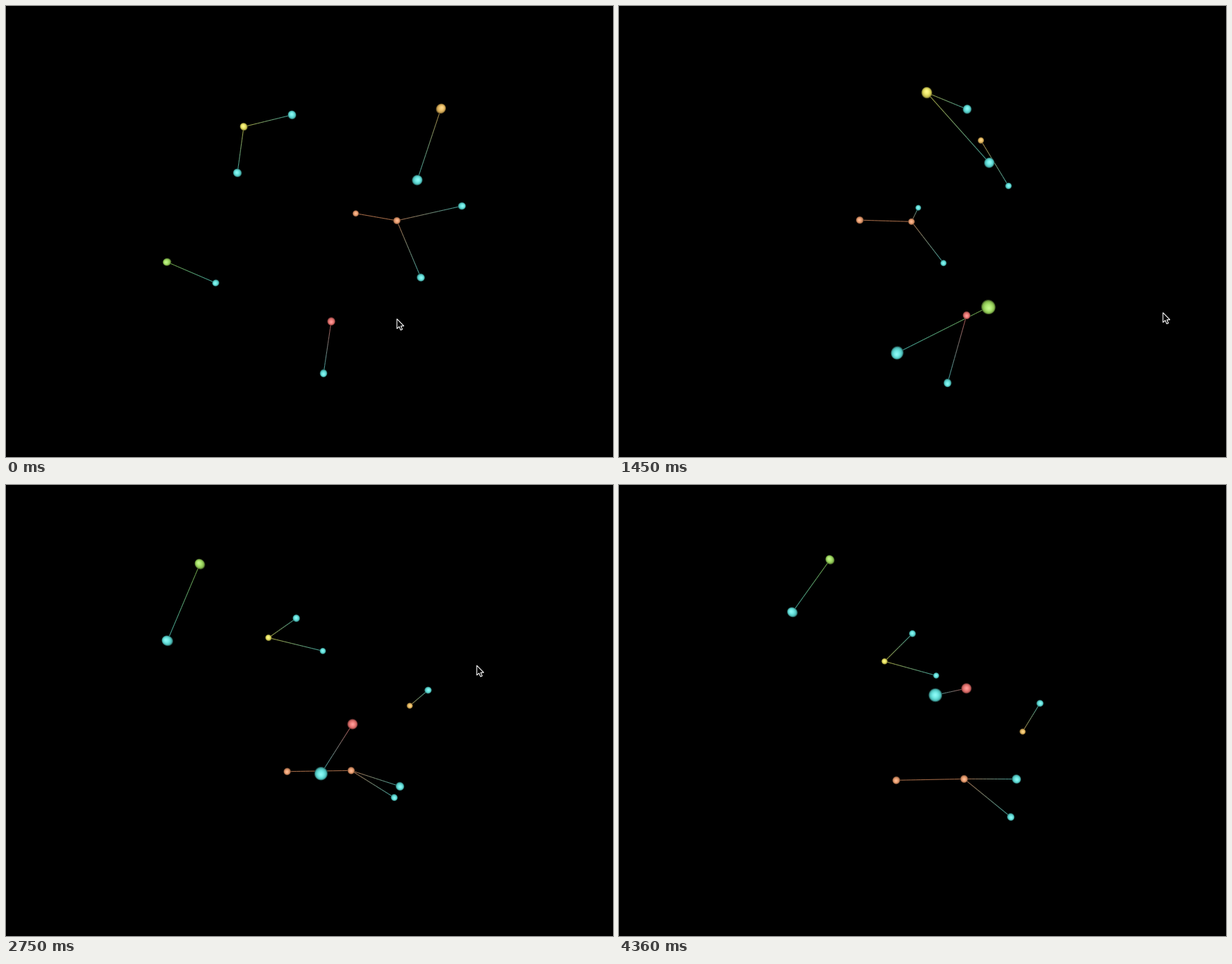
A matplotlib script for the animation above (4760 ms loop, 868x645 px).

```python
import numpy as np
import matplotlib.pyplot as plt
from matplotlib.animation import FuncAnimation
from matplotlib.collections import LineCollection, PolyCollection
from matplotlib.patches import Polygon

W, H = 868, 645
LOOP, STEP = 4760, 28
NAMES = "ABCDEFGHIJKLM"
LINKS = np.array([[NAMES.index(c) for c in pair]
                  for pair in "AB AC DE GF GH GI JK LM".split()])
CYAN = (98, 246, 240)
TINTS = {"A": (255, 248, 98), "D": (255, 202, 98), "F": (255, 166, 112),
         "G": (255, 166, 112), "J": (172, 242, 98), "L": (255, 120, 116)}
RGB = np.array([TINTS.get(c, CYAN) for c in NAMES]) / 255
DIAMETER = 11.2

# Where the stars stand on screen after each turn of the model
VIEWS = [
    dict(A=(340, 173), B=(409, 156), C=(331, 239), D=(622, 147), E=(588, 249),
         F=(500, 297), G=(559, 307), H=(652, 286), I=(593, 388), J=(230, 366),
         K=(300, 396), L=(465, 451), M=(454, 525)),
    dict(A=(326, 167), C=(335.5, 237), D=(628.5, 155), F=(473, 297),
         H=(624.5, 284), I=(585, 380.5), J=(207.5, 380.5), M=(454.5, 528)),
    dict(A=(440.5, 124), B=(498, 147.5), C=(529.5, 224), D=(517.5, 192),
         E=(557, 257), F=(344, 306), G=(418, 308.5), H=(428, 288.5),
         I=(464, 368), J=(528.5, 430.5), K=(398, 496), L=(497, 442),
         M=(470, 539)),
    dict(A=(372, 128), C=(459, 215.5), E=(596, 257), F=(373, 308),
         I=(506, 373.5), J=(347, 409), K=(287.5, 467), M=(463.5, 543)),
    dict(A=(354, 157), B=(448, 168), C=(399, 175.5), D=(585, 230.5),
         E=(611.5, 257.5), F=(411.5, 358.5), G=(494.5, 359), H=(549.5, 363.5),
         I=(553.5, 414), J=(225, 237.5), K=(220.5, 363), L=(492.5, 434),
         M=(455.5, 557)),
    dict(A=(380, 253.5), B=(453.5, 274), C=(420, 213.5), D=(577.5, 354),
         E=(602, 313), F=(396.5, 422.5), G=(493.5, 420.5), H=(560.5, 475.5),
         I=(568.5, 420), J=(302, 107), K=(248.5, 181), L=(497, 289),
         M=(452.5, 296.5)),
]
SEEN = np.array([[v.get(c, (np.nan, np.nan)) for c in NAMES] for v in VIEWS])
KNOWN = ~np.isnan(SEEN)

# First guesses: camera (focal length, centre), turns in degrees, depths
CAM = np.array([420, W / 2, H / 2])
TURNS = np.radians([(0, 17, 0), (0, 81, 0), (-3, -28, 0),
                    (-32, -25, 0), (-60, 3, 0)])
DEPTH = np.array([-35, 16, 19, 100, 115, -79, -10, 20, 25, 5, -50, 45, 6])

# time, turn progress, pointer x, pointer y
KEYS = np.array([
    (0, 0, 559, 447.5), (470, 0, 559, 447.5), (800, 1, 597, 445.5),
    (990, 1.26, 659, 443), (1450, 2, 778, 438.5), (1545, 2, 778.5, 438),
    (1850, 3, 703, 419), (2060, 3.8, 669, 372), (2160, 4, 668, 361),
    (2415, 4, 668, 361), (2930, 4.97, 675, 218), (3130, 5, 675, 214),
    (3310, 5, 675, 214), (3400, 6, 685, 238), (3790, 6, 855, 560),
    (3930, 6, 855, 561), (4180, 6, 844, 641), (LOOP, 6, 844, 641)])
POINTER_GONE = 4350


def rotation(w):
    angle = np.linalg.norm(w)
    if angle < 1e-12:
        return np.eye(3)
    x, y, z = w / angle
    k = np.array([[0, -z, y], [z, 0, -x], [-y, x, 0]])
    return np.eye(3) + np.sin(angle) * k + (1 - np.cos(angle)) * k @ k


def chain(turns):
    poses = [np.eye(3)]
    for w in turns:
        poses.append(rotation(w) @ poses[-1])
    return poses


def project(points, pose, cam):
    """Screen positions and magnification of the turned points."""
    f, cx, cy = cam
    q = points @ pose.T
    k = f / np.maximum(f - q[:, 2], 60)
    return np.column_stack([cx + k * q[:, 0], cy - k * q[:, 1]]), k


def unpack(p):
    return p[:3], p[3:18].reshape(5, 3), p[18:].reshape(-1, 3)


def misfit(p):
    cam, turns, points = unpack(p)
    shown = np.array([project(points, r, cam)[0] for r in chain(turns)])
    length = np.linalg.norm(points[LINKS[:, 0]] - points[LINKS[:, 1]], axis=1)
    return np.concatenate([(shown - SEEN)[KNOWN],
                           0.02 * (length - length.mean()),
                           (cam - CAM) / (50, 8, 8)])


def solve_model(rounds=90, eps=1e-4):
    """Damped least squares for the camera, the turns and the star places."""
    x, y = (SEEN[0] - CAM[1:]).T * (1 - DEPTH / CAM[0])
    p = np.concatenate([CAM, TURNS.ravel(),
                        np.column_stack([x, -y, DEPTH]).ravel()])
    r, damp = misfit(p), 0.01
    for _ in range(rounds):
        jac = np.array([(misfit(p + d) - r) / eps
                        for d in eps * np.eye(len(p))]).T
        a, g = jac.T @ jac, jac.T @ r
        for _ in range(8):
            trial = p - np.linalg.solve(
                a + np.diag(damp * np.diag(a) + 1e-9), g)
            r_new = misfit(trial)
            if r_new @ r_new < r @ r:
                break
            damp *= 4
        else:
            break
        gain = r @ r - r_new @ r_new
        p, r, damp = trial, r_new, max(damp / 5, 1e-7)
        if gain < 1e-5:
            break
    return unpack(p)


def glide(t, ts, vs):
    """Monotone cubic through the keys."""
    h = np.diff(ts)
    d = np.diff(vs) / h
    prod = d[:-1] * d[1:]
    m = np.zeros(len(ts))
    m[1:-1] = np.where(prod > 0,
                       2 * prod / np.where(prod > 0, d[:-1] + d[1:], 1), 0)
    i = min(np.searchsorted(ts, t, side="right") - 1, len(h) - 1)
    s = (t - ts[i]) / h[i]
    return (vs[i] + s * s * (3 - 2 * s) * (vs[i + 1] - vs[i])
            + h[i] * s * (1 - s) * ((1 - s) * m[i] - s * m[i + 1]))


cam, turns, stars = solve_model()
turns = np.vstack([turns, (0.0105, 0, 0)])
poses = chain(turns)

fig = plt.figure(figsize=(W / 100, H / 100), dpi=100, facecolor="black")
ax = fig.add_axes([0, 0, 1, 1])
ax.set_xlim(0, W)
ax.set_ylim(H, 0)
ax.axis("off")

# Links fade from one star's colour to the other's
PIECES = 14
mix = ((np.arange(PIECES) + 0.5) / PIECES)[None, :, None]
link_rgb = (RGB[LINKS[:, 0], None] * (1 - mix) + RGB[LINKS[:, 1], None] * mix)
lines = LineCollection([], colors=0.62 * link_rgb.reshape(-1, 3),
                       linewidths=0.8, zorder=1)
ax.add_collection(lines)

# Each ball is a stack of discs that shrink towards its highlight
RINGS = np.linspace(1, 0.12, 9)
shade = (0.36 + 0.64 * (1 - RINGS ** 2) ** 0.42)[None, :, None]
gloss = (0.35 * (1 - RINGS) ** 1.5)[None, :, None]
ball_rgb = RGB[:, None] * shade * (1 - gloss) + gloss
turn = np.linspace(0, 2 * np.pi, 32, endpoint=False)
CIRCLE = np.column_stack([np.cos(turn), np.sin(turn)])
balls = PolyCollection([], linewidths=0, edgecolors="none", zorder=2)
ax.add_collection(balls)

ARROW = np.array([(0, 0), (0, 14), (3.2, 11), (5.4, 16), (7.8, 15),
                  (5.6, 10.2), (10, 10.2)])
pointer = Polygon(ARROW, closed=True, facecolor="black", edgecolor="white",
                  linewidth=0.8, zorder=3)
ax.add_patch(pointer)


def ball(centre, k):
    radius = DIAMETER * k / 2
    lean = (centre - cam[1:]) / cam[0]
    dist = np.hypot(*lean)
    axis = lean / max(dist, 1e-9)
    stretch = np.sqrt(1 + dist ** 2) - 1
    rim = CIRCLE + stretch * (CIRCLE @ axis)[:, None] * axis
    return [centre + radius * (rho * rim + 0.8 * (1 - rho) * lean)
            for rho in RINGS]


def draw(n):
    t = (n + 0.5) * STEP
    stage, px, py = (glide(t, KEYS[:, 0], KEYS[:, c]) for c in (1, 2, 3))
    i = min(int(stage), len(turns) - 1)
    pose = rotation((stage - i) * turns[i]) @ poses[i]
    xy, k = project(stars, pose, cam)

    a, b = xy[LINKS[:, 0], None], xy[LINKS[:, 1], None]
    path = a + (b - a) * np.linspace(0, 1, PIECES + 1)[None, :, None]
    lines.set_segments(np.stack([path[:, :-1], path[:, 1:]], axis=2)
                       .reshape(-1, 2, 2))

    order = np.argsort(k)
    balls.set_verts([v for j in order for v in ball(xy[j], k[j])])
    balls.set_facecolor(ball_rgb[order].reshape(-1, 3))

    pointer.set_xy(ARROW + (px, py))
    pointer.set_visible(t < POINTER_GONE)
    return lines, balls, pointer


anim = FuncAnimation(fig, draw, frames=LOOP // STEP, interval=STEP,
                     init_func=lambda: draw(0), repeat=True, repeat_delay=0)
plt.show()
```
